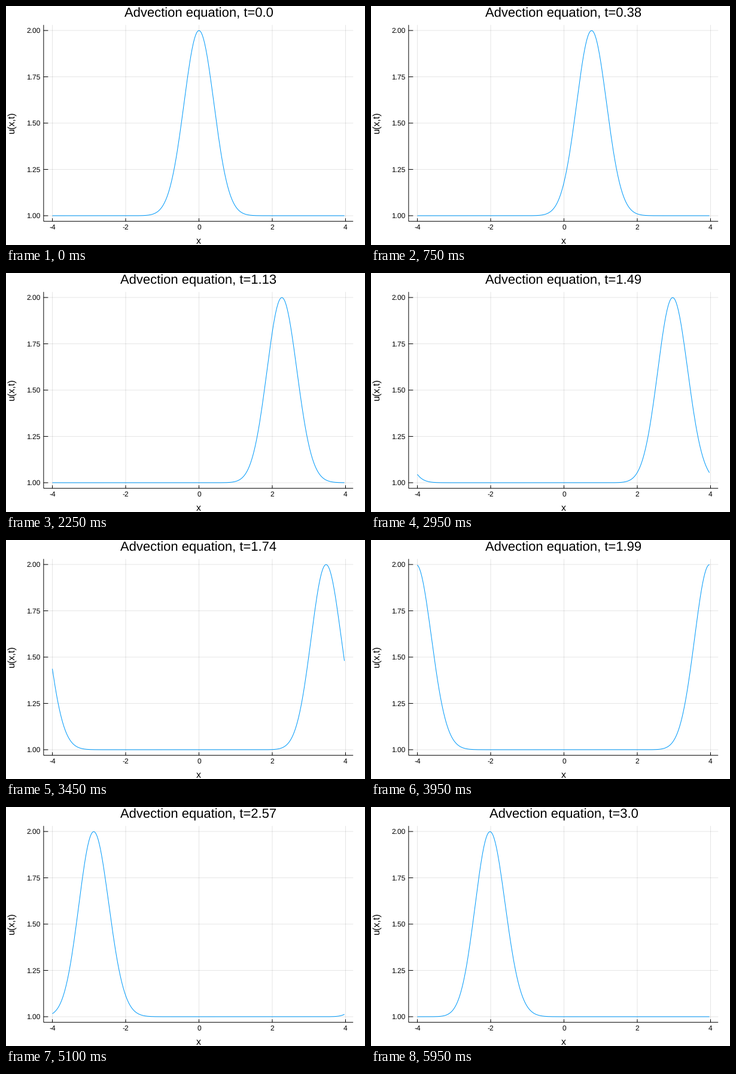
A matplotlib script for the animation above (6 s loop, 600 px wide and 400 px high).

```python
import numpy as np
import matplotlib.pyplot as plt
from matplotlib.animation import FuncAnimation

W, H, DPI = 600, 400, 100
FRAMES, INTERVAL = 120, 50
T_END, SPEED, PERIOD, N = 3.0, 2.0, 8.0, 256
LEFT, RIGHT, TOP, BOTTOM = 62.86, 580.2, 31.7, 360.3

plt.rcParams["font.family"] = "Liberation Sans"
plt.rcParams["text.hinting"] = "none"
plt.rcParams["text.hinting_factor"] = 1

dx = PERIOD / N
x = -4 + dx * np.arange(N)
times = np.linspace(0, T_END, FRAMES)

# Central differences move each Fourier mode a little too slowly.
modes = np.fft.rfft(np.exp(-3 * x**2))
k = 2 * np.pi * np.fft.rfftfreq(N, dx)
omega = SPEED * np.sin(k * dx) / dx


def wave(t):
    return 1 + np.fft.irfft(modes * np.exp(-1j * omega * t), N)


def px(n):
    """Pixels to points."""
    return n * 72 / DPI


def to_x(v):
    return 322.5 + 61.25 * v


def to_y(v):
    return 351 - 310 * (v - 1)


fig = plt.figure(figsize=(W / DPI, H / DPI), dpi=DPI, facecolor="white")
ax = fig.add_axes([0, 0, 1, 1])
ax.set_xlim(0, W)
ax.set_ylim(H, 0)
ax.axis("off")


def stroke(xs, ys, color="black", **kw):
    return ax.plot(xs, ys, color=color, lw=px(1), snap=False,
                   solid_capstyle="butt", **kw)[0]


def label(cx, cy, text, size, ha="center", **kw):
    return ax.text(cx, cy, text, fontsize=px(size), ha=ha, va="baseline", **kw)


for v in range(-4, 5, 2):
    cx = to_x(v)
    stroke([cx, cx], [TOP, BOTTOM], alpha=0.1)
    stroke([cx, cx], [BOTTOM, BOTTOM - 5])
    label(cx, 374, f"{v}", 12.1)
for v in np.arange(1, 2.01, 0.25):
    cy = to_y(v)
    stroke([LEFT, RIGHT], [cy, cy], alpha=0.1)
    stroke([LEFT, LEFT + 7.5], [cy, cy])
    label(57.8, cy + 4.2, f"{v:.2f}", 12.1, ha="right")

stroke([LEFT, LEFT], [TOP, BOTTOM])
stroke([LEFT, RIGHT], [BOTTOM, BOTTOM])

label(322, 398.5, "x", 15.8)
label(14, 195, "u(x,t)", 15.6, rotation=90, rotation_mode="anchor")
title = label(322, 18, "", 21.6)
line = stroke(to_x(x), to_y(wave(0)), "#009afa")


def update(i):
    t = times[i]
    line.set_ydata(to_y(wave(t)))
    title.set_text(f"Advection equation, t={round(float(t), 2)}")
    return line, title


anim = FuncAnimation(fig, update, frames=FRAMES, interval=INTERVAL,
                     repeat=True, repeat_delay=0, blit=False)
plt.show()
```
